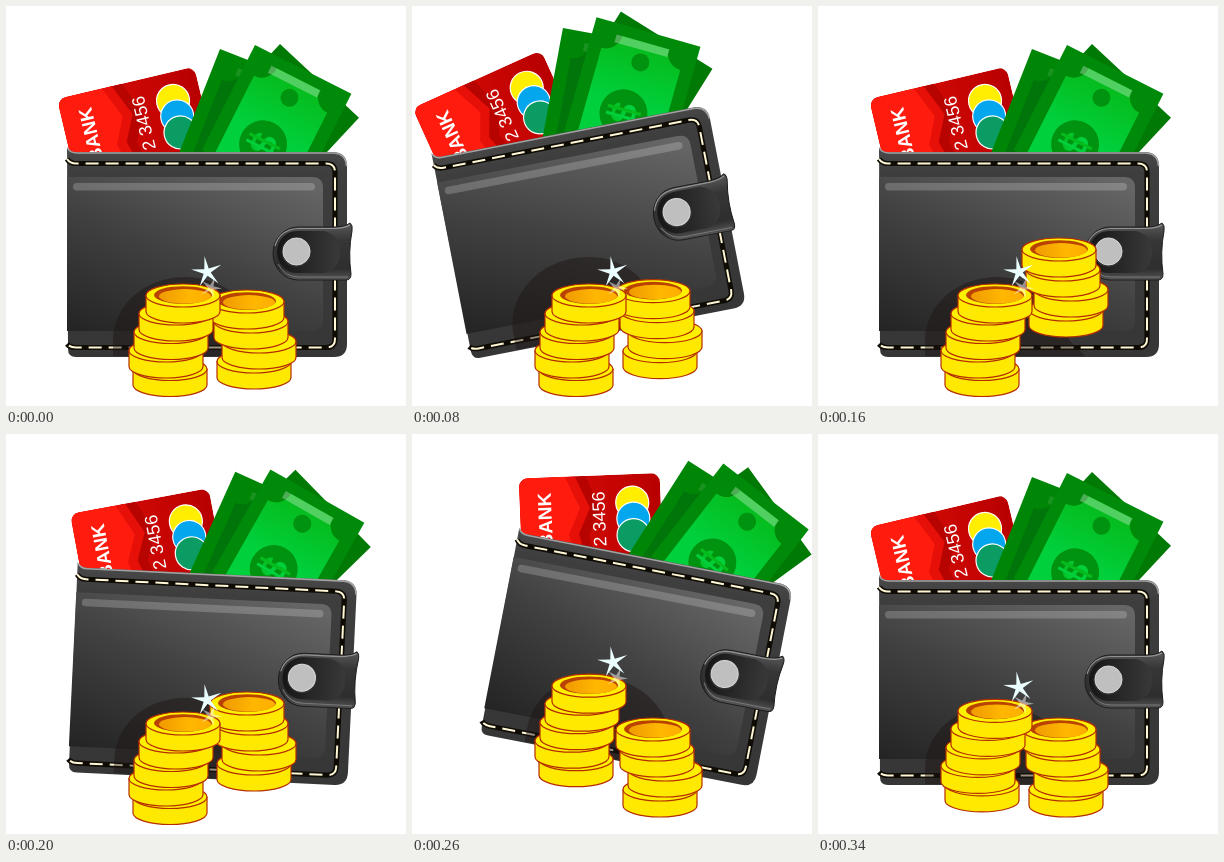
Animation of 400x400 px, one loop 0.36 s. Source, as an HTML page:

```html
<!DOCTYPE html>
<html lang="en">
<head>
<meta charset="utf-8">
<title>Wallet and coins</title>
<style>
html, body { margin: 0; width: 100%; height: 100%; overflow: hidden; background: #fff; }
svg { display: block; width: 100vw; height: 100vh; }
text { font-family: "Liberation Sans", Arial, sans-serif; }
</style>
</head>
<body>
<svg viewBox="0 0 400 400">
  <defs>
    <linearGradient id="leather" gradientUnits="userSpaceOnUse" x1="0.15" y1="1" x2="0.75" y2="0"
      gradientTransform="translate(61 159) scale(266 181)">
      <stop offset="0" stop-color="#242424"/>
      <stop offset="0.5" stop-color="#414141"/>
      <stop offset="1" stop-color="#666"/>
    </linearGradient>
    <linearGradient id="rim" x1="0" y1="0" x2="0" y2="1">
      <stop offset="0" stop-color="#4a4a4a"/>
      <stop offset="0.12" stop-color="#3e3e3e"/>
      <stop offset="1" stop-color="#363636"/>
    </linearGradient>
    <linearGradient id="strap" x1="0" y1="0" x2="0" y2="1">
      <stop offset="0" stop-color="#5a5a5a"/>
      <stop offset="0.3" stop-color="#363636"/>
      <stop offset="0.8" stop-color="#2e2e2e"/>
      <stop offset="1" stop-color="#555"/>
    </linearGradient>
    <linearGradient id="pad">
      <stop offset="0" stop-color="#161616"/>
      <stop offset="1" stop-color="#393939"/>
    </linearGradient>
    <linearGradient id="red">
      <stop offset="0" stop-color="#e01008"/>
      <stop offset="1" stop-color="#b80000"/>
    </linearGradient>
    <linearGradient id="gold">
      <stop offset="0" stop-color="#f09a00"/>
      <stop offset="0.6" stop-color="#ffb700"/>
      <stop offset="1" stop-color="#ffae00"/>
    </linearGradient>
    <linearGradient id="mint" x1="0" y1="0" x2="0" y2="1">
      <stop offset="0" stop-color="#06ba1a"/>
      <stop offset="0.6" stop-color="#00d03c"/>
    </linearGradient>
    <clipPath id="cardClip"><rect width="141" height="95" rx="9"/></clipPath>
  </defs>

  <g id="wallet">
    <g transform="translate(51 93) rotate(-13.300)">
      <g clip-path="url(#cardClip)">
        <rect width="141" height="95" fill="url(#red)"/>
        <path d="M50 0H67L80 34 68 60 78 95H40z" fill="#b80400"/>
        <path d="M0 0H56L70 32 58 58 68 95H0z" fill="#e61008"/>
        <path d="M0 0H46L60 32 48 58 58 95H0z" fill="#ff1c0e"/>
      </g>
      <g fill="#fff">
        <text transform="translate(31.500 70) rotate(-90)" font-size="19" font-weight="700">BANK</text>
        <text transform="translate(85 71) rotate(-90)" font-size="18">2 3456</text>
      </g>
      <g stroke="#fff" stroke-width="1.200">
        <circle cx="112.500" cy="28.500" r="16.500" fill="#ffee00"/>
        <circle cx="113" cy="44.500" r="16.500" fill="#04a6ee"/>
        <circle cx="112.500" cy="61" r="16.500" fill="#0a9c62"/>
      </g>
    </g>
    <g id="bills"></g>

    <path d="M61 141Q63 146 70 146H328Q341 147 341 160V338Q341 351 328 351H70Q62 351 62 343z" fill="url(#rim)"/>
    <path d="M61.500 142Q64 147 71 147H328Q340 148 340.500 160" fill="none" stroke="#a2a2a2" stroke-width="1.600"/>
    <path d="M61 171H306Q317 171 317 182V313Q317 325 305 325H61z" fill="url(#leather)"/>
    <rect x="67" y="177" width="242" height="7.500" rx="3.700" fill="#fff" opacity="0.2"/>
    <g fill="none">
      <path d="M61 153Q64 157.500 70 157.500H320Q329 157.500 329 166V333Q329 341.500 320 341.500H70Q64 341.500 61 338" stroke="#0f0c06" stroke-width="5.200"/>
      <path d="M61 153Q64 157.500 70 157.500H320Q329 157.500 329 166V333Q329 341.500 320 341.500H70Q64 341.500 61 338" stroke="#fff6d6" stroke-width="2" stroke-dasharray="13 7"/>
    </g>
    <path d="M107 350V334A72 63 0 0 1 251 334L267 350z" fill="#1c1210" opacity="0.45"/>

    <path d="M292 221H328Q339 221 344 217Q347 219 346 225Q342 246 345 268Q345 274 340 274H292A25 26.500 0 0 1 292 221z" fill="url(#strap)" stroke="#1d1d1d"/>
    <path d="M269 240Q274 223 293 222.500H328Q339 222 344 219" fill="none" stroke="#929292" stroke-width="1.200"/>
    <path d="M272 258Q279 271 293 271H342" fill="none" stroke="#777"/>
    <path d="M291 225H318Q334 229 334 246Q334 264 318 267H291A20 21 0 0 1 291 225z" fill="url(#pad)"/>
    <circle cx="290.500" cy="246" r="15" fill="#333"/>
    <circle cx="290.500" cy="245.500" r="13.500" fill="#bfbfbf" stroke="#d8d8d8"/>
  </g>

  <g id="right"></g>
  <g id="left"></g>
</svg>
<script>
const $ = id => document.getElementById(id);
const STEP = 20, LOOP = 360;

function bill(x, y, turn, base, panel, mark, shine) {
  return `<g transform="translate(${x} ${y}) rotate(${turn})">
    <rect width="108" height="118" fill="${base}"/>
    <path d="M30 11H78A17 17 0 0 0 95 28V118H13V28A17 17 0 0 0 30 11z" fill="${panel}"/>
    <circle cx="54.500" cy="31.500" r="9" fill="${mark}"/>
    <circle cx="52" cy="85" r="24" fill="${mark}"/>
    <rect x="24" y="11" width="55" height="8" fill="#fff" opacity="${shine}"/>
    <text transform="translate(64 85) rotate(-90)" font-size="34" font-weight="700" text-anchor="middle" fill="${panel}">S</text>
    <path d="M35 81.500H69M35 88.500H69" stroke="${panel}" stroke-width="3"/>
  </g>`;
}

function coin(x, bottom, top) {
  const y = bottom - 27.5, cx = x + 37;
  const face = top ? `
    <ellipse cx="${cx}" cy="${y - 0.5}" rx="29" ry="8.800" fill="#b94200"/>
    <ellipse cx="${cx + 2}" cy="${y + 0.8}" rx="26" ry="7.200" fill="url(#gold)"/>` : "";
  return `<g stroke="#b42c00" stroke-width="1.200">
    <path d="M${x} ${y}V${y + 16}A37 11.500 0 0 0 ${x + 74} ${y + 16}V${y}z" fill="#ffe900"/>
    <ellipse cx="${cx}" cy="${y}" rx="37" ry="11.500" fill="#fff000"/>
  </g>${face}`;
}

// coins are listed from the bottom up
const stack = list => list.map(([x, b], i) => coin(x, b, i === list.length - 1)).join("");

// five-armed spark; inner sets how thin the arms are
function spark(cx, cy, outer, inner, turn) {
  const pts = Array.from({ length: 10 }, (_, i) => {
    const a = (turn + i * 36) * Math.PI / 180, r = i % 2 ? inner : outer;
    return `${cx + r * Math.sin(a)},${cy - r * Math.cos(a)}`;
  });
  return `<polygon points="${pts.join(" ")}"`;
}

$("bills").innerHTML =
  bill(274, 38, 43, "#007a04", "#008a0c", "#007004", 0.1) +
  bill(214, 43, 21.5, "#008606", "#00760a", "#006c04", 0.1) +
  bill(249, 39, 26.8, "#008a0a", "url(#mint)", "#00930f", 0.3);

$("right").innerHTML = stack([[211, 383], [216, 363], [208, 343], [204, 323]]);
$("left").innerHTML = stack([[127, 390.5], [123, 372], [128, 353.5], [133, 335], [140, 317]]) +
  spark(205, 282, 11, 3, 20) + ` fill="#fff" opacity="0.5"/>` +
  spark(201, 266, 16, 3.8, -9) + ` fill="#ecffff"/>`;

// straight rise from a to peak, straight fall from peak to b
function hop(t, a, peak, b) {
  if (t <= a || t >= b) return 0;
  return t < peak ? (t - a) / (peak - a) : (b - t) / (b - peak);
}

function draw(ms) {
  const t = Math.floor((ms % LOOP) / STEP) * STEP;
  const swing = t < 170
    ? `rotate(${-11 * hop(t, 0, 80, 160)} 73 360)`
    : `rotate(${11 * hop(t, 180, 260, 340)} 330 358)`;
  $("wallet").setAttribute("transform", swing);
  $("right").setAttribute("transform", `translate(0 ${-52 * hop(t, 60, 160, 240)})`);
  $("left").setAttribute("transform", `translate(0 ${-50.4 * hop(t, 200, 280, 360)})`);
}

const start = performance.now();
function tick() {
  draw(performance.now() - start);
  requestAnimationFrame(tick);
}
tick();
</script>
</body>
</html>
```
